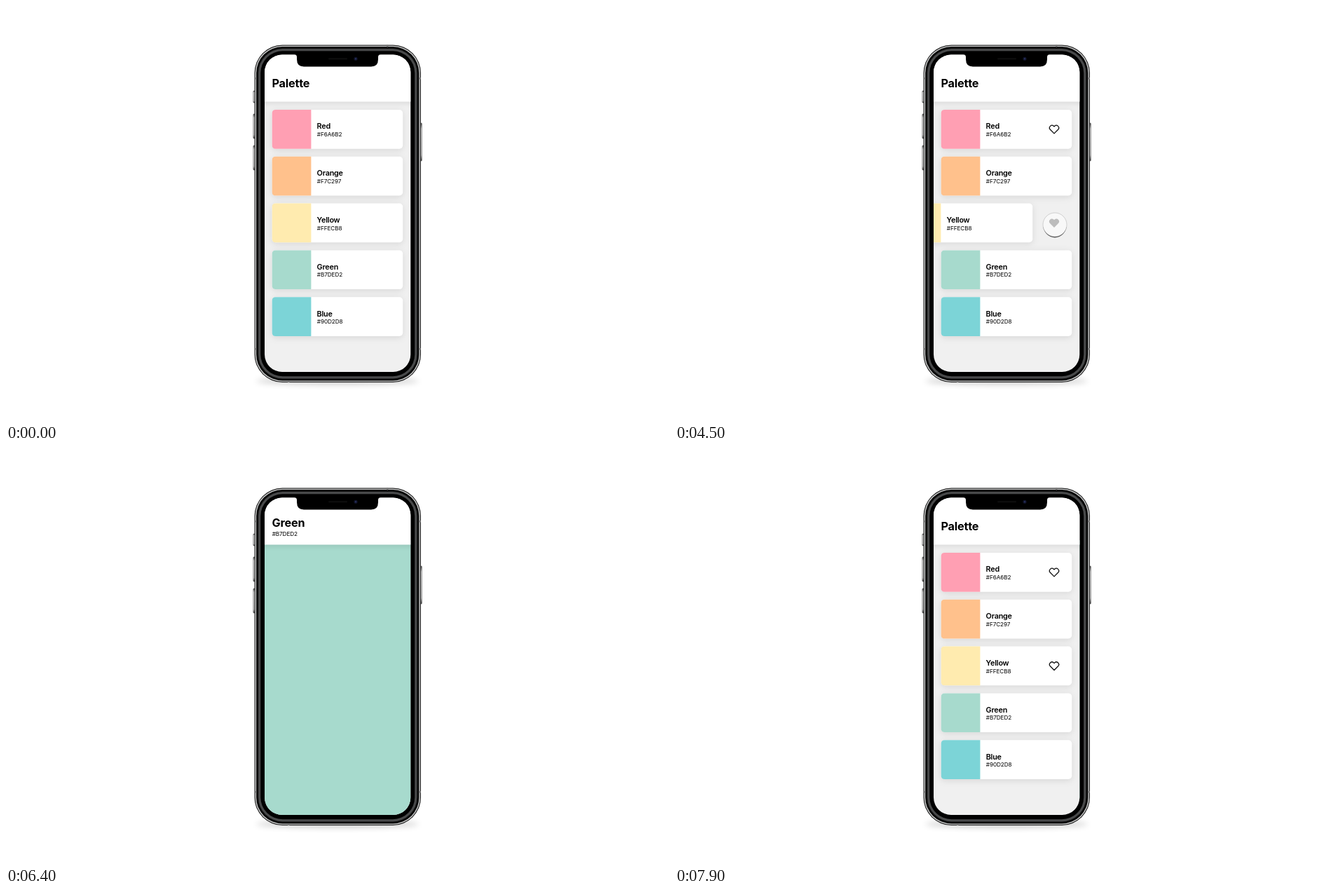
Animation, 946 px wide and 592 px high, one loop 8000 ms. Source, as an HTML page:

```html
<!DOCTYPE html>
<html lang="en">
<head>
<meta charset="utf-8">
<title>Palette</title>
<style>
  html, body { margin: 0; width: 100%; height: 100%; overflow: hidden; background: #fff; }
  svg { display: block; width: 946px; height: 592px; font-family: Inter, sans-serif; }
  .title { font-size: 16.2px; font-weight: 700; letter-spacing: -.01em; }
  .name { font-size: 10.8px; font-weight: 600; letter-spacing: -.02em; }
  .hex { font-size: 8.2px; letter-spacing: -.01em; }
  .card { filter: drop-shadow(0 2px 5px rgba(0, 0, 0, .1)); }
  .header { filter: drop-shadow(0 1px 4px rgba(0, 0, 0, .12)); }
  .blur { filter: blur(4px); }
</style>
</head>
<body>
<svg viewBox="0 0 946 592">
  <defs>
    <clipPath id="screen"><rect x="369" y="69.5" width="208.3" height="452.5" rx="25"/></clipPath>
    <path id="heart" d="M0-3.6L-.7-4.3A3.75 3.75 0 0 0-6 1L0 7L6 1A3.75 3.75 0 0 0 .7-4.3Z"/>
    <linearGradient id="metal" x2="0" y2="1">
      <stop stop-color="#444"/><stop offset=".15" stop-color="#ddd"/>
      <stop offset=".85" stop-color="#ccc"/><stop offset="1" stop-color="#333"/>
    </linearGradient>
  </defs>
  <ellipse class="blur" cx="473" cy="535" rx="116" ry="5" fill="#000" opacity=".2"/>
  <g id="body"></g>
  <g clip-path="url(#screen)">
    <rect x="368" y="69" width="210" height="454" fill="#f0f0f0"/>
    <g id="cards"></g>
    <rect id="page" x="369" y="130" width="208.5" height="394" fill="#a7dacd"/>
    <rect class="header" x="360" y="60" width="226" height="76.5" fill="#fff"/>
    <text id="listTitle" class="title" x="379.5" y="116.3">Palette</text>
    <g id="pageTitle">
      <text class="title" x="379.5" y="110.5">Green</text>
      <text class="hex" x="379.7" y="124.2">#B7DED2</text>
    </g>
    <g id="touch">
      <circle r="17" fill="#fff" fill-opacity=".55" stroke="#000" stroke-opacity=".22" stroke-width=".7"/>
      <path d="M-17 0A17 17 0 0 0 17 0A17 18.5 0 0 1-17 0Z" opacity=".6"/>
    </g>
  </g>
  <path d="M411 69h124q-4 0-4 4v3q0 10.500-10 10.500h-96q-10 0-10-10.500v-3q0-4-4-4z"/>
  <rect x="460" y="74" width="27" height="2.500" rx="1.200" fill="#0c0c0c"/>
  <circle cx="499" cy="75.300" r="2.600" fill="#10142a"/>
  <circle cx="499" cy="75.300" r="1.100" fill="#2c3566"/>
</svg>
<script>
const LOOP = 8000, STEP = 100, SCREEN_WIDTH = 208, REVEAL = 56;
const OPEN_AT = 5600, CLOSE_AT = 6818, STAGGER = 35;
const byId = id => document.getElementById(id);

const colors = [
  { name: 'Red', hex: '#F6A6B2', fill: '#ff9fb3', swipe: [900, 1400], back: [2400, 2900] },
  { name: 'Orange', hex: '#F7C297', fill: '#ffc18c' },
  { name: 'Yellow', hex: '#FFECB8', fill: '#ffebaf', swipe: [3100, 3600], back: [4600, 5100] },
  { name: 'Green', hex: '#B7DED2', fill: '#a7dacd' },
  { name: 'Blue', hex: '#90D2D8', fill: '#7cd4d7' }
];

// time, x, y, opacity
const touchPath = [
  [800, 535, 173, 0], [900, 535, 173, 1], [1300, 470, 173, 1], [1450, 465, 173, 0],
  [1900, 505, 173, 0], [2000, 513, 173, .7], [2200, 541, 176, 1], [2400, 542, 177, 1],
  [2800, 543, 265, 1], [3050, 535, 312, 1], [3500, 472, 312, 1], [3800, 472, 312, 1],
  [4300, 542, 312, 1], [4550, 542, 312, 1], [4800, 542, 312, 0],
  [5250, 417, 375, 0], [5400, 417, 375, 1], [5550, 417, 375, 1], [5800, 417, 375, 0],
  [6750, 392, 379, 0], [6850, 400, 379, 1], [7100, 484, 379, 1], [7300, 520, 379, 1],
  [7500, 525, 379, 0]
];

const clamp = v => Math.min(1, Math.max(0, v));
const smooth = (t, from, to) => {
  const p = clamp((t - from) / (to - from));
  return p * p * (3 - 2 * p);
};

// Underdamped spring from 0 to 1
function spring(ms) {
  if (ms <= 0) return 0;
  const phase = ms * .01086;
  return 1 - Math.exp(-.855 * phase) * (Math.cos(phase) + .855 * Math.sin(phase));
}

function buildBody() {
  const button = (x, y, h) =>
    `<rect x="${x}" y="${y}" width="3" height="${h}" rx="1" fill="url(#metal)" stroke="#555" stroke-width=".6"/>`;
  const layer = ([inset, fill]) =>
    `<rect x="${354.5 + inset}" y="${55.5 + inset}" width="${237.5 - 2 * inset}" height="${481.5 - 2 * inset}" rx="${40 - inset}" fill="${fill}"/>`;
  const mark = (x, y, w, h) => `<rect x="${x}" y="${y}" width="${w}" height="${h}" fill="#777"/>`;
  const layers = [[0, '#2a2a2a'], [1.2, '#d2d3d3'], [2.6, '#0a0a0a'], [5.6, '#48494a'], [8.8, '#000']];
  byId('body').innerHTML =
    button(352.8, 121, 17) + button(352.8, 154, 35) + button(352.8, 199, 35) + button(590.4, 167, 54) +
    layers.map(layer).join('') +
    mark(354.5, 102, 3, 2.5) + mark(354.5, 488, 3, 2.5) +
    mark(589, 102, 3, 2.5) + mark(589, 488, 3, 2.5) +
    mark(543, 55.5, 2.5, 3) + mark(402, 534, 2.5, 3);
}

function buildCards() {
  byId('cards').innerHTML = colors.map(({ name, hex, fill }, i) => {
    const y = 148 + 66.8 * i;
    return `<use href="#heart" x="541" y="${y + 27.3}" fill="#6b6b6b" id="action${i}"/>
      <g class="card" id="card${i}">
        <rect x="379.7" y="${y}" width="186.5" height="55.7" rx="5" fill="#fff"/>
        <path d="M435.4 ${y}v55.7h-50.7q-5 0-5-5v-45.7q0-5 5-5z" fill="${fill}"/>
        <text class="name" x="443.6" y="${y + 27.3}">${name}</text>
        <text class="hex" x="443.8" y="${y + 38}">${hex}</text>
        <use href="#heart" id="liked${i}" transform="translate(541 ${y + 27.3}) scale(.94)"
          fill="none" stroke="#111" stroke-width="1.4" stroke-linejoin="round"/>
      </g>`;
  }).join('');
}

function touchAt(t) {
  const next = touchPath.findIndex(point => point[0] > t);
  if (next < 1) return [0, 0, 0];
  const a = touchPath[next - 1], b = touchPath[next];
  const p = smooth(t, a[0], b[0]);
  return [1, 2, 3].map(k => a[k] + (b[k] - a[k]) * p);
}

function render(t) {
  const away = delay => spring(t - OPEN_AT - delay) - spring(t - CLOSE_AT - delay);

  colors.forEach(({ swipe, back }, i) => {
    const revealed = swipe ? smooth(t, ...swipe) - smooth(t, ...back) : 0;
    const x = -REVEAL * revealed - SCREEN_WIDTH * away(i * STAGGER);
    byId('card' + i).setAttribute('transform', `translate(${x} 0)`);
    byId('action' + i).setAttribute('opacity', clamp(revealed * 1.5));
    byId('liked' + i).setAttribute('opacity', back ? smooth(t, back[0], back[0] + 200) : 0);
  });

  const pageX = SCREEN_WIDTH * Math.max(0, 1 - away(0)) + (away(0) <= 0 ? 10 : 0);
  byId('page').setAttribute('transform', `translate(${pageX} 0)`);

  const detail = smooth(t, OPEN_AT, OPEN_AT + 300) - smooth(t, CLOSE_AT, CLOSE_AT + 250);
  byId('listTitle').setAttribute('opacity', 1 - detail);
  byId('pageTitle').setAttribute('opacity', detail);

  const [x, y, opacity] = touchAt(t);
  const touch = byId('touch');
  touch.setAttribute('transform', `translate(${x} ${y})`);
  touch.setAttribute('opacity', opacity);
}

buildBody();
buildCards();
const start = performance.now();
function tick() {
  const t = (performance.now() - start) % LOOP;
  render(Math.floor(t / STEP) * STEP);
  requestAnimationFrame(tick);
}
tick();
</script>
</body>
</html>
```
